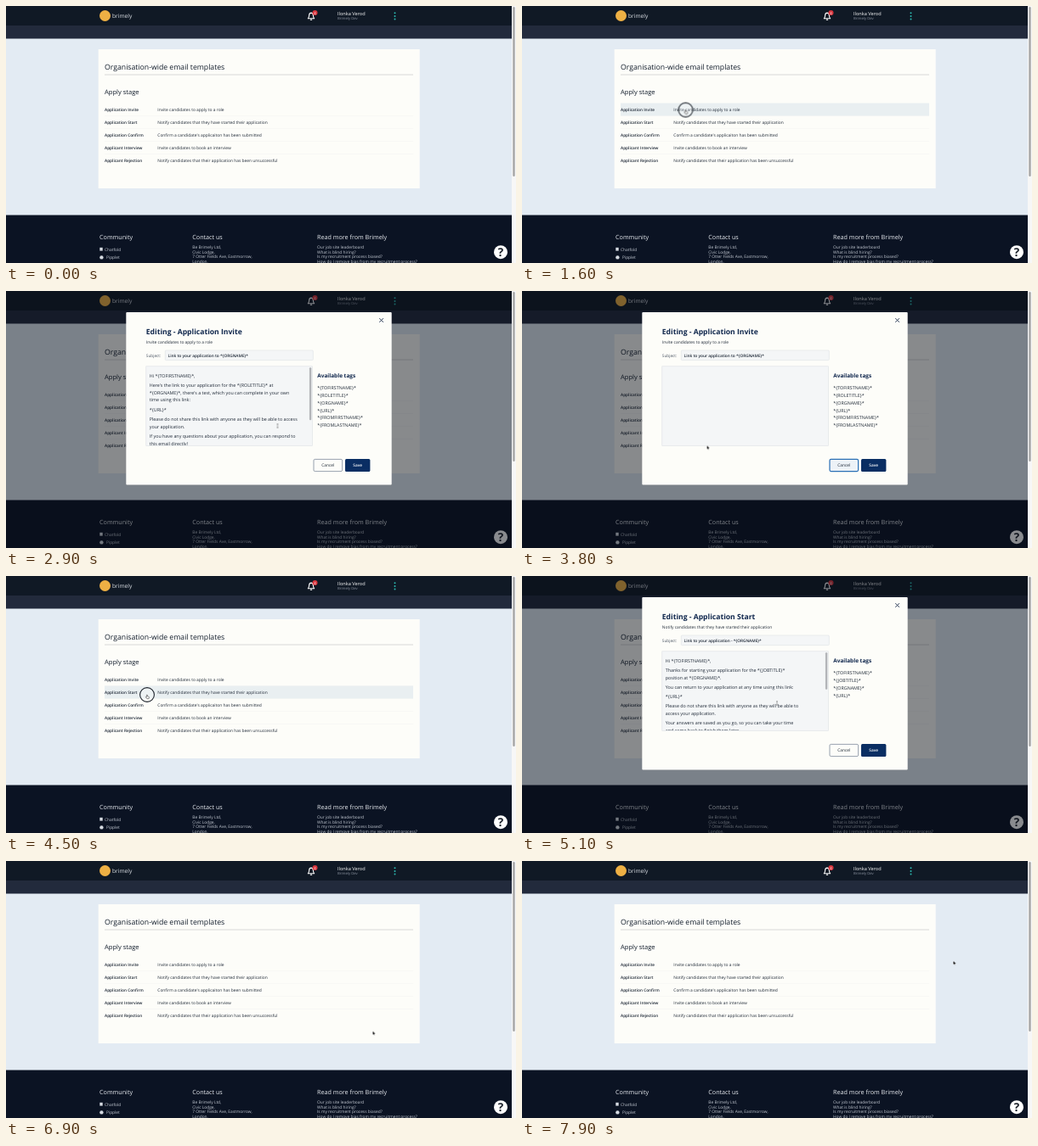
Write an HTML page that moves like this. It is 600x303 px and loops after 8 s.

```html
<!DOCTYPE html>
<html lang="en">
<head>
<meta charset="utf-8">
<title>Email templates</title>
<style>
html, body { margin: 0; width: 100%; height: 100%; overflow: hidden; background: #e3ebf3; }
svg { display: block; width: 600px; height: 303px; }
text { font: 4.9px 'Open Sans', 'Noto Sans', sans-serif; fill: #1f2937; text-rendering: geometricPrecision; white-space: pre; }
.h1 { font-size: 8.7px; font-weight: 500; fill: #111c2b; }
.h2 { font-size: 7.55px; font-weight: 500; fill: #111c2b; }
.label { font-size: 4.75px; font-weight: 600; }
.brand { font-size: 6.6px; fill: #dfe3e8; }
.user { font-size: 5.6px; font-weight: 500; fill: #fff; }
.team { font-size: 4.25px; fill: #8d95a2; }
.foot { font-size: 7.2px; fill: #e8ebf0; }
.link { font-size: 4.85px; fill: #c3c9d2; }
.title { font-size: 8.6px; font-weight: 700; fill: #10274d; }
.tags { font-size: 6.45px; font-weight: 700; fill: #10274d; }
.mail, .tag { font-size: 5.35px; }
.muted { font-size: 4.75px; fill: #4b5563; }
.mid { text-anchor: middle; }

.hover, .modal, .a, .b, .mailA, .mailB, .cancel, .ring, .arrow, .hand, .beam { animation: 8s step-end infinite; }
.hover { animation-name: hover; }
.modal { animation-name: modal; }
.a { animation-name: first; }
.b { animation-name: second; }
.mailA { animation-name: mailA; }
.mailB { animation-name: mailB; }
.cancel { animation-name: cancel; }
.ring { animation-name: ring; }
.arrow { animation-name: arrow; }
.hand { animation-name: hand; }
.beam { animation-name: beam; }
.cursor { animation: cursor 8s ease-in-out infinite; }
.scroll { animation: scroll 8s ease-in-out infinite; }
.thumb { animation: thumb 8s ease-in-out infinite; }

@keyframes hover {
  0%, 21.25%, 57.5%, 100% { opacity: 0; transform: none; }
  10% { opacity: 1; transform: none; }
  48.75% { opacity: 1; transform: translateY(45px); }
  50.9% { opacity: 1; transform: translateY(30px); }
  53.15% { opacity: 1; transform: translateY(15px); }
}
@keyframes modal { 0%, 48.75%, 85%, 100% { opacity: 0; } 21.25%, 57.5% { opacity: 1; } }
@keyframes first { 0%, 48.75%, 100% { opacity: 0; } 21.25% { opacity: 1; } }
@keyframes second { 0%, 85%, 100% { opacity: 0; } 57.5% { opacity: 1; } }
@keyframes mailA { 0%, 45.6%, 100% { opacity: 0; } 21.25% { opacity: 1; } }
@keyframes mailB { 0%, 83.2%, 100% { opacity: 0; } 57.5% { opacity: 1; } }
@keyframes cancel {
  0%, 48.75%, 85%, 100% { fill: #fdfdf9; stroke: #56657c; stroke-width: .6px; }
  41.9%, 74.3% { fill: #edf0f3; stroke: #56657c; stroke-width: .6px; }
  45%, 82.5% { fill: #edf2f7; stroke: #2a6fb5; stroke-width: 1.2px; }
}
@keyframes ring {
  0%, 21.25%, 44.6%, 57.5%, 82.5%, 100% { opacity: 0; }
  18.8%, 42.6%, 55.7%, 80.8% { opacity: 1; }
}
@keyframes arrow {
  0%, 45%, 73.1%, 85%, 100% { opacity: 1; }
  10%, 41.9%, 48.75%, 74.3% { opacity: 0; }
  40.6% { opacity: 1; }
}
@keyframes hand {
  0%, 21.25%, 45%, 57.5%, 85%, 100% { opacity: 0; }
  10%, 41.9%, 48.75%, 74.3% { opacity: 1; }
}
@keyframes beam { 0%, 40.6%, 73.1%, 100% { opacity: 0; } 21.25%, 57.5% { opacity: 1; } }
@keyframes cursor {
  0% { transform: translate(620px, 104px); }
  1.25% { transform: translate(597px, 104px); animation-timing-function: ease-in; }
  7.5% { transform: translate(440px, 110px); animation-timing-function: ease-out; }
  13.75%, 27.5% { transform: translate(192.5px, 122.5px); }
  35.6%, 38.1% { transform: translate(319.5px, 159px); }
  42.5%, 44.4% { transform: translate(378px, 205.5px); }
  47.25% { transform: translate(217.7px, 182.5px); }
  47.5% { transform: translate(217.7px, 182.5px); animation-timing-function: linear; }
  53.75%, 58.1% { transform: translate(166px, 140px); }
  63.75%, 71.25% { transform: translate(300px, 150px); }
  74.75%, 78.1% { transform: translate(364.5px, 212px); }
  81%, 83.75% { transform: translate(378px, 205.5px); }
  88.75%, 93.1% { transform: translate(484px, 196px); }
  98.75%, 100% { transform: translate(507.5px, 118px); }
}
@keyframes scroll { 0%, 64% { transform: none; } 71.5%, 100% { transform: translateY(-105px); } }
@keyframes thumb { 0%, 64% { transform: none; } 71.5%, 100% { transform: translateY(47.5px); } }
</style>
</head>
<body>
<svg viewBox="0 0 600 303">
  <defs><clipPath id="box"><path d="M165 89.5h195v92.5h-195z"/></clipPath></defs>

  <g id="page">
    <path fill="#e3ebf3" d="M0 0h595v303H0z"/>
    <path fill="#101925" d="M0 0h595v23H0z"/>
    <path fill="#222a3c" d="M0 23h595v15.5H0z"/>
    <path fill="#0b1323" d="M0 246.5h595v57H0z"/>
    <circle cx="116.5" cy="11.5" r="6.5" fill="#eeb044"/>
    <g fill="none" stroke="#fff" stroke-width="1.1" stroke-linejoin="round">
      <path d="M355.3 14.8h7.4q-1.3-1.2-1.3-3.5 0-3-2.4-3.2-2.4.2-2.4 3.2 0 2.3-1.3 3.5zM358 15.8q1 1 2 0"/>
    </g>
    <circle cx="363.5" cy="8" r="3" fill="#d9363e"/>
    <g fill="#2bb8b0">
      <circle cx="457.5" cy="8.3" r="1"/><circle cx="457.5" cy="11.9" r="1"/><circle cx="457.5" cy="15.5" r="1"/>
    </g>
    <path fill="#fdfdf9" d="M108.7 51h378v164h-378z"/>
    <path stroke="#cfcfcd" stroke-width=".8" d="M116 81h363"/>
    <path fill="none" stroke="#f3f3f0" stroke-width=".5" d="M116 129.5h363m-363 15h363m-363 15h363m-363 15h363"/>
    <path class="hover" fill="#e9eff1" d="M116 114.5h363v15h-363z"/>
    <rect x="110.3" y="284.8" width="3.4" height="3.8" fill="#d5dae1"/>
    <circle cx="112.4" cy="296.4" r="2.2" fill="#d5dae1"/>
    <circle cx="582" cy="290.2" r="8" fill="#fff"/>
  </g>

  <g class="modal">
    <path fill="#0a0d15" fill-opacity=".48" d="M0 0h595v303H0z"/>
    <rect x="141.3" y="25" width="312.4" height="203.5" rx="1" fill="#fdfdf9"/>
    <path d="M439.3 32.2l4.6 4.6m0-4.6l-4.6 4.6" stroke="#2c3c58" stroke-width="1"/>
    <g fill="#f4f6f7" stroke="#dde1e5" stroke-width=".6">
      <rect x="187.3" y="70" width="174" height="11.6" rx="1"/>
      <rect x="164.8" y="88.8" width="195.6" height="93.6"/>
    </g>
    <rect class="cancel" x="362" y="198.4" width="33.6" height="14.2" rx="1.5"/>
    <rect x="399" y="198" width="29.4" height="15" rx="1.5" fill="#0a2e63"/>
    <g id="form"></g>
    <g class="a" id="formA"></g>
    <g class="b" id="formB"></g>
    <g clip-path="url(#box)">
      <g class="mailA">
        <g id="mailA"></g>
        <rect x="356.9" y="90.3" width="2.4" height="62" rx="1" fill="#b3b5b8"/>
      </g>
      <g class="mailB">
        <g class="scroll" id="mailB"></g>
        <rect class="thumb" x="356.9" y="90.3" width="2.4" height="43.5" rx="1" fill="#b3b5b8"/>
      </g>
    </g>
  </g>

  <path fill="#f7f7f7" d="M595 0h5v303h-5z"/>
  <rect x="596.3" y="1" width="2.4" height="200" rx="1.2" fill="#a5a5a5"/>

  <g class="cursor">
    <circle class="ring" r="8.4" fill="#fff" fill-opacity=".25" stroke="#20262e" stroke-width="1.1"/>
    <path class="arrow" fill="#111" stroke="#fff" stroke-width=".5" paint-order="stroke" d="M0 0v4l1-.9.7 1.5.6-.3-.7-1.4h1.3z"/>
    <path class="hand" fill="#fff" stroke="#222" stroke-width=".5" d="M-.6.3q.6-.6 1 0v1.6l1.6.4q.5.2.4.8l-.4 1.6h-2.2l-1.5-2q.2-.6 1.1.1z"/>
    <path class="beam" fill="none" stroke="#555" stroke-width=".5" d="M-1-2.4l1 .4 1-.4M0-2v4M-1 2.4l1-.4 1 .4"/>
  </g>
</svg>

<script>
const byId = id => document.getElementById(id);

function put(id, cls, x, y, str) {
  const el = document.createElementNS('http://www.w3.org/2000/svg', 'text');
  el.setAttribute('class', cls);
  el.setAttribute('x', x);
  el.setAttribute('y', y);
  el.textContent = str;
  byId(id).append(el);
}

function list(id, cls, x, y, step, lines) {
  lines.forEach((s, i) => put(id, cls, x, y + i * step, s));
}

// Paragraphs are separated by a slightly larger step than lines.
function mail(id, paras) {
  let y = 101.7;
  for (const p of paras) {
    const lines = p.split('\n');
    list(id, 'mail', 168.8, y, 8.7, lines);
    y += (lines.length - 1) * 8.7 + 11.25;
  }
}

const tag = name => `*{${name}}*`;

put('page', 'brand', 125, 13.6, 'brimely');
put('page', 'user', 390, 11.3, 'Ilonka Verod');
put('page', 'team', 390, 16.3, 'Brimely Dev');
put('page', 'h1', 116, 75.2, 'Organisation-wide email templates');
put('page', 'h2', 116, 103.6, 'Apply stage');
list('page', 'label', 116, 123.8, 15, [
  'Application Invite', 'Application Start', 'Application Confirm',
  'Applicant Interview', 'Applicant Rejection']);
list('page', 'row', 178.3, 123.8, 15, [
  'Invite candidates to apply to a role',
  'Notify candidates that they have started their application',
  "Confirm a candidate's applicaiton has been submitted",
  'Invite candidates to book an interview',
  'Notify candidates that their application has been unsuccessful']);
put('page', 'foot', 110, 275, 'Community');
put('page', 'foot', 219.3, 275, 'Contact us');
put('page', 'foot', 366, 275, 'Read more from Brimely');
put('page', 'link', 116, 288.5, 'Chatfold');
put('page', 'link', 118, 298.3, 'Pipplet');
list('page', 'link', 219.3, 286.3, 5.5, [
  'Be Brimely Ltd,', 'Civic Lodge,', '7 Otter Fields Ave, Eastmorrow,', 'London,']);
list('page', 'link', 366, 286.3, 5.5, [
  'Our job site leaderboard', 'What is blind hiring?', 'Is my recruitment process biased?',
  'How do I remove bias from my recruitment process?']);

const mark = (cls, x, y, s, css) => {
  put('page', cls, x, y, s);
  byId('page').lastChild.style.cssText = css;
};
mark('mid', 363.5, 9.6, '4', 'font-size:4.2px;fill:#fff');
mark('mid', 582, 295, '?', 'font-size:13.5px;font-weight:700;fill:#1d232c');

put('form', 'muted', 164.8, 77.7, 'Subject:');
put('form', 'tags', 366.3, 102, 'Available tags');
put('form', 'mid', 378.8, 207.3, 'Cancel');
put('form', 'mid label', 413.7, 207.3, 'Save');
byId('form').lastChild.style.fill = '#fff';

function head(id, name, note, subject, tags) {
  put(id, 'title', 164.8, 50.6, 'Editing - Application ' + name);
  put(id, 'row', 164.8, 61.9, note);
  put(id, 'label', 190.6, 77.6, subject);
  list(id, 'tag', 366.3, 116.3, 8.75, tags.map(tag));
}
head('formA', 'Invite', 'Invite candidates to apply to a role',
  'Link to your application to ' + tag('ORGNAME'),
  ['TOFIRSTNAME', 'ROLETITLE', 'ORGNAME', 'URL', 'FROMFIRSTNAME', 'FROMLASTNAME']);
head('formB', 'Start', 'Notify candidates that they have started their application',
  'Link to your application - ' + tag('ORGNAME'),
  ['TOFIRSTNAME', 'JOBTITLE', 'ORGNAME', 'URL']);

mail('mailA', [
  'Hi *{TOFIRSTNAME}*,',
  "Here's the link to your application for the *{ROLETITLE}* at\n*{ORGNAME}*, there's a test, which you can complete in your own\ntime using this link:",
  '*{URL}*',
  'Please do not share this link with anyone as they will be able to access\nyour application.',
  'If you have any questions about your application, you can respond to\nthis email directly!']);
mail('mailB', [
  'Hi *{TOFIRSTNAME}*,',
  'Thanks for starting your application for the *{JOBTITLE}*\nposition at *{ORGNAME}*.',
  'You can return to your application at any time using this link:',
  '*{URL}*',
  'Please do not share this link with anyone as they will be able to\naccess your application.',
  'Your answers are saved as you go, so you can take your time\nand come back to finish them later.',
  "Brimely is a platform fixing hiring by giving you the opportunity to\nshowcase your skills with the confidence that you won't be judged on\nthings that don't matter like where you went to school, where you've\nworked, and if you look the part.",
  "*{ORGNAME}* will review the answers on your application to the\n*{JOBTITLE}* position without knowledge of who you are, where you're\nfrom or what you've done in the past. Each question you answer will\nbe reviewed on it's own without reference to any of the other\nquestions you've answered."]);
</script>
</body>
</html>
```
